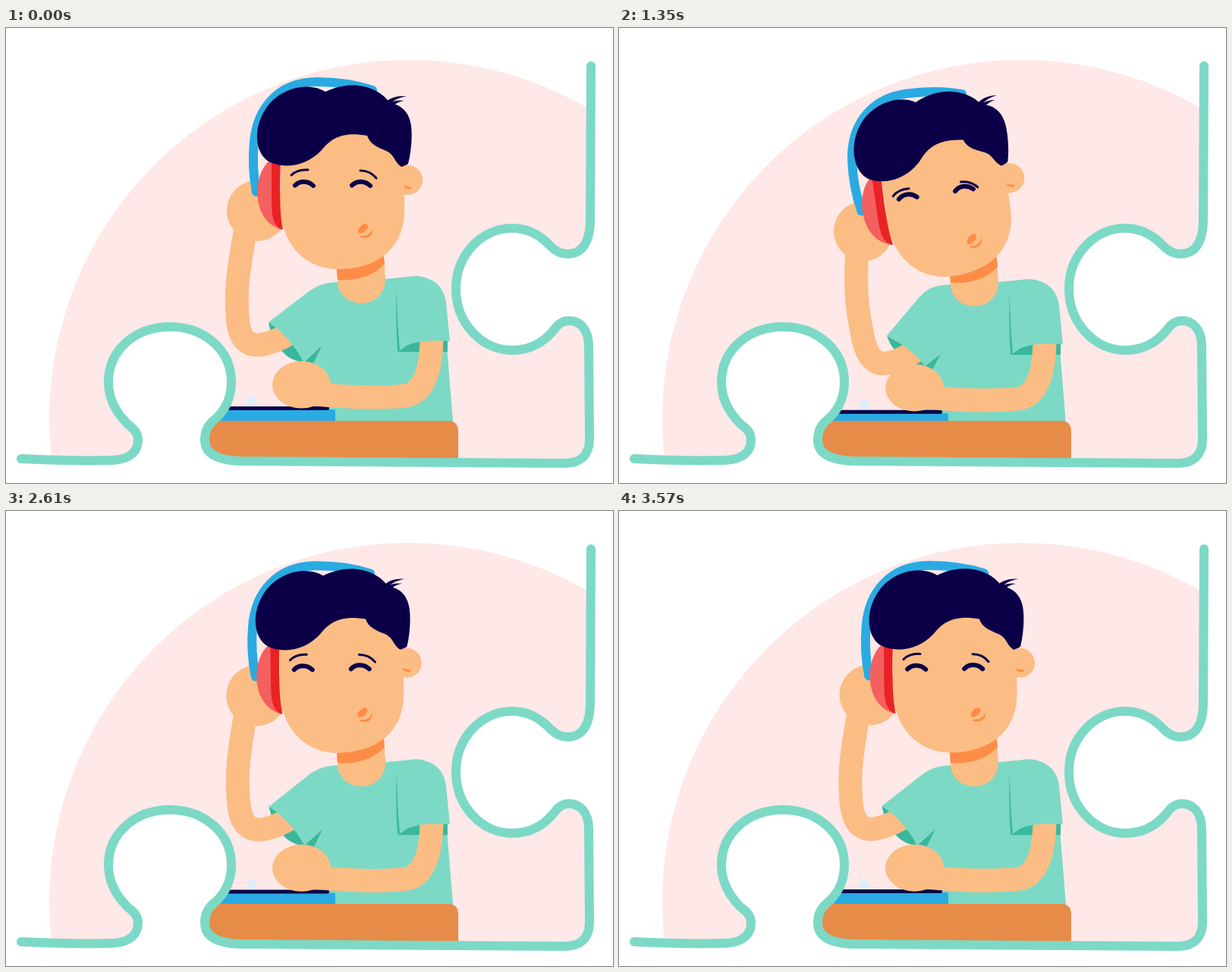
Animation of 800x600 px, one loop 3600 ms. Source, as an HTML page:

```html
<!DOCTYPE html>
<html lang="en">
<head>
<meta charset="utf-8">
<title>Listening at the desk</title>
<style>
  html, body { margin: 0; width: 100%; height: 100%; overflow: hidden; background: #fff; }
  svg { display: block; width: 800px; height: 600px; }
  .skin { fill: #fbbd84; }
  .shirt { fill: #7cd9c5; }
  .fold { fill: #39b89c; }
  .dark { fill: #0b0048; }
  .orange { fill: #ff8c46; }
  .blue { fill: #29abe2; }
  .limb { fill: none; stroke: #fbbd84; stroke-width: 31; }
  .line { fill: none; stroke: #0b0048; stroke-linecap: round; }
</style>
</head>
<body>
<svg viewBox="0 0 800 600">
  <defs>
    <path id="edge" d="M20 568C60 570 100 571 140 570C165 569 174 557 174 543C174 532 166 527 160 522C144 506 135 488 135 467C135 425 170 394 216 394C262 394 297 425 297 467C297 488 288 506 273 518C266 524 262 531 262 543C262 563 282 570 308 571L737 574C757 574 769 563 769 542L768 420C768 398 757 386 742 386C734 386 728 390 723 397C708 416 688 425 667 425C627 425 593 389 593 344C593 299 627 264 667 264C688 264 705 274 718 288C726 296 733 298 740 298C761 298 770 280 770 252L771 50V0H20"/>
    <clipPath id="piece"><use href="#edge"/></clipPath>
  </defs>

  <g clip-path="url(#piece)">
    <circle cx="530" cy="515" r="473" fill="#fee8e8"/>

    <!-- raised arm and shirt: data-to holds the tilted pose -->
    <path class="fold" d="M346 388C350 410 365 440 392 440L375 408Z" data-to="M353 406C360 426 378 446 409 452L385 424Z"/>
    <path class="limb" d="M316 265C304 330 303 350 305 380C307 413 320 421 340 417C355 414 365 408 384 397" data-to="M314 290C311 340 313 365 320 400C325 432 336 446 355 442C370 439 383 432 400 420"/>
    <path class="skin" d="M291 241C291 219 309 201 331 201S371 219 371 241S353 281 331 281S291 263 291 241" data-to="M283 268C283 246 301 229 322 229S361 246 361 268S343 308 322 308S283 290 283 268"/>
    <path class="shirt" d="M437 335C420 336 412 339 401 346L346 388Q375 408 392 440L417 418L405 443L398 530L590 530L577 370C574 340 558 327 540 327L500 331Z" data-to="M437 338C412 340 406 344 394 357L353 406Q386 422 407 450L424 430L408 461L398 534L590 534L577 374C574 344 558 331 540 331L500 335Z"/>
    <path class="fold" d="M393 440L417 418L405 443Z" data-to="M400 449L424 430L408 461Z"/>

    <g class="bob">
      <path class="skin" d="M435 300H498L500 331C500 350 486 363 468 363C450 363 437 349 437 335Z"/>
      <path class="orange" d="M434 300L437 332C465 334 485 326 499 311L497 295Z"/>
    </g>

    <g id="head">
      <path d="M330 216C325 190 325 170 327 150C331 105 360 71 410 71C440 71 465 76 483 82" fill="none" stroke="#29abe2" stroke-width="12" stroke-linecap="round"/>
      <circle class="skin" cx="529.5" cy="200.5" r="19.5"/>
      <path d="M523 192C518 201 521 211 533 211" fill="none" stroke="#ff8c46" stroke-width="3" stroke-linecap="round"/>
      <path class="skin" d="M362 130V235C362 285 395 318 437 318C490 318 525 290 525 240V130Z"/>
      <path d="M352 172C325 185 320 255 364 266Z" fill="#f4605f"/>
      <path d="M350 172H362C361 205 360 245 365 266C351 262 350 245 350 225Z" fill="#ea2226"/>
      <path class="dark" d="M521 183Q528 181 530 179C535 160 536 135 533 124C530 110 520 101 506 99C493 79 458 66 421 84C398 70 362 79 344 104C324 132 328 167 348 177C372 187 398 180 416 161C428 146 443 136 476 142C480 154 490 157 503 163C513 169 511 176 521 183Z"/>
      <path class="dark" d="M499 99Q510 88 528 90Q514 92 506 100ZM504 100Q513 94 525 96Q516 97 510 103Z"/>
      <path class="line" stroke-width="6" d="M381 207.5C387 201 398 201 405 208M456 207.5C462 201 473 201 480 208"/>
      <g id="features">
        <path class="line" stroke-width="3" d="M376 194Q384 186 398 187M467 188Q480 188 488 198"/>
        <ellipse class="orange" cx="470.5" cy="264.5" rx="8" ry="4.5" transform="rotate(-42 470.5 264.5)"/>
        <path class="orange" d="M467 274Q480 275 484 264Q483 280 467 276Z"/>
      </g>
    </g>

    <g id="deck">
      <ellipse cx="323.5" cy="494" rx="7" ry="9" fill="#e0eefa"/>
      <path class="blue" d="M260 503H432Q434 503 434 505V530H260Z"/>
      <path class="line" stroke-width="5" d="M270 501.5H423.5"/>
    </g>

    <g class="bob">
      <g id="arm">
        <path class="fold" d="M517 427L540 410H582V427Z"/>
        <path class="limb" d="M561 405C561 455 549 483 525 485C490 489 450 487 408 483" stroke-width="32"/>
        <ellipse class="skin" cx="389.5" cy="470.5" rx="38.5" ry="31"/>
        <path class="shirt" d="M515 347L517 426Q535 409 585 413L580 362C577 340 563 330 545 328Z"/>
        <path class="fold" d="M515 345Q513 380 516 427L519 425Q515 380 515 345Z"/>
      </g>
    </g>

    <path d="M250 518H582Q596 518 596 532V590H250Z" fill="#e78b48"/>
  </g>

  <path id="outline" fill="none" stroke="#7cd9c5" stroke-width="12" stroke-linecap="round"/>
</svg>
<script>
  const LOOP = 3600, STEP = 30, NOD = LOOP / 7, NOD_MOVE = 204, DECK = LOOP / 4;
  const $ = id => document.getElementById(id);
  const clamp = x => Math.max(0, Math.min(1, x));
  const smooth = x => x * x * (3 - 2 * x);
  const numbers = /-?\d+(\.\d+)?/g;

  $('outline').setAttribute('d', $('edge').getAttribute('d').replace('V0H20', ''));

  const morphs = [...document.querySelectorAll('[data-to]')].map(path => ({
    path, from: path.getAttribute('d'), to: path.dataset.to.match(numbers)
  }));
  const bobs = document.querySelectorAll('.bob');
  const place = (el, transform) => el.setAttribute('transform', transform);

  function draw(t) {
    // Nod down, rest, come back up
    const phase = t % NOD;
    const nod = smooth(clamp(Math.min(phase, NOD - phase) / NOD_MOVE));
    const dip = (1 - Math.cos(2 * Math.PI * t / DECK)) / 2;
    const swipe = Math.sin(Math.PI * clamp((t - 1560) / 600)) ** 2;

    for (const { path, from, to } of morphs) {
      let i = 0;
      path.setAttribute('d', from.replace(numbers, n => +n + (to[i++] - n) * nod));
    }
    bobs.forEach(el => place(el, `translate(0 ${4 * nod})`));
    place($('head'), `translate(${430 - 13 * nod} ${206 + 11.5 * nod}) rotate(${-8.2 * nod}) translate(-430 -206)`);
    place($('features'), `translate(${-2 * nod} ${8.5 * nod})`);
    place($('deck'), `translate(0 ${4.8 * dip})`);
    place($('arm'), `translate(0 345) matrix(1 0 ${-0.1 * swipe} ${1 + 0.02 * swipe} 0 0) translate(0 -345)`);
  }

  const start = performance.now();
  function tick() {
    const t = (performance.now() - start) % LOOP;
    draw(Math.floor(t / STEP) * STEP);
    requestAnimationFrame(tick);
  }
  draw(0);
  requestAnimationFrame(tick);
</script>
</body>
</html>
```
